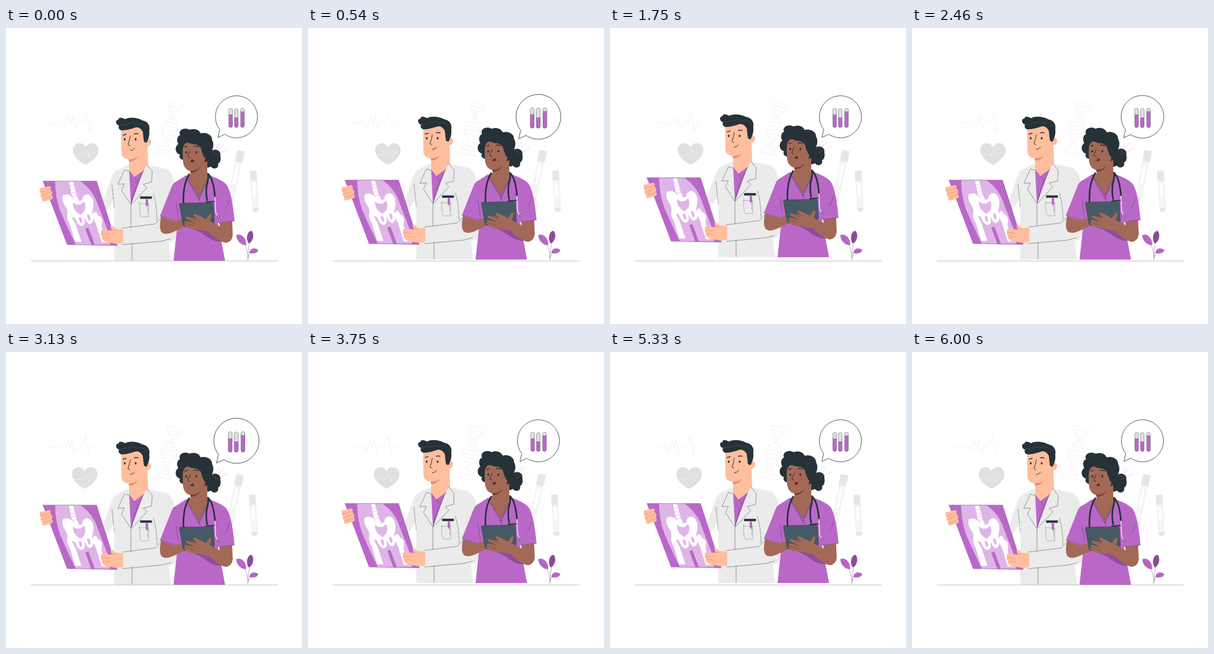
These frames come from a looping animation (500 px wide and 500 px high, 6040 ms). An HTML page:

```html
<!DOCTYPE html>
<html lang="en">
<head>
<meta charset="utf-8">
<title>Doctors reviewing an X-ray</title>
<style>
html, body { margin: 0; width: 100%; height: 100%; overflow: hidden; background: #fff; }
svg { display: block; width: 100vw; height: 100vh; }
.line { fill: none; stroke: #263238; stroke-width: .6; stroke-linecap: round; stroke-linejoin: round; }
.line.thick { stroke-width: 1; }
.line.brow { stroke-width: 1.5; }
.line.crease { stroke: #e58a70; }
.line.knuckle { stroke: #70372f; }
.line.hem { stroke: #763884; }
.dark { fill: #263238; }
.purple { fill: #ba68c8; }
.peach { fill: #ffbe9d; }
.brown { fill: #a36957; }
.coat { fill: #ebebeb; }
.pale { fill: none; stroke: #ececec; stroke-width: .7; }
.glass { fill: #f5f5f5; stroke: #ececec; stroke-width: .6; }
.cap { fill: #e6e6e6; }
.bone { fill: #fff; stroke: #fff; stroke-width: .6; stroke-linejoin: round; }
</style>
</head>
<body>
<svg viewBox="0 0 500 500">
  <g id="backdrop">
    <path class="pale" d="M73 161H84L88 158L92 161H96L100 167L106 150L110 163L113 148L117 171L121 160L126 158L130 161L136 141L141 175L145 161H152"/>
    <path fill="#e0e0e0" d="M134.500 231C126 227 113 218 113 206C113 194 128 190 134.500 201C141 190 156 194 156 206C156 218 143 227 134.500 231Z"/>
    <path fill="none" stroke="#f3f3f3" stroke-width=".7" d="M116 215H127L130 212L132 216L137 205L141 220L145 211H151"/>
    <g id="helix" class="pale"></g>
    <g transform="translate(397 207) rotate(12)">
      <path class="glass" d="M-5 19H5V84Q5 88 0 88Q-5 88-5 84Z"/>
      <path class="cap" d="M-6.500 0H6.500V19H-6.500ZM-5 80H5V84Q5 88 0 88Q-5 88-5 84Z"/>
      <path fill="#fff" d="M-2.500 25H2V58H-2.500Z"/>
    </g>
    <g transform="translate(417.500 241) rotate(-3.500)">
      <path class="glass" d="M-5 16H5V65Q5 69.500 0 69.500Q-5 69.500-5 65Z"/>
      <path class="cap" d="M-5.700 0H5.700V17H-5.700ZM-5 63H5V65Q5 69.500 0 69.500Q-5 69.500-5 65Z"/>
      <path fill="#fff" d="M-2.500 21H2V44H-2.500Z"/>
    </g>
  </g>

  <path d="M42 393.500H459" stroke="#c4c4c4"/>
  <g>
    <path class="line" stroke-opacity=".6" d="M408.500 392C409 380 406 370 401 362M409 386C409 374 411 367 412 359M409 389C410 382 413 379 418 377"/>
    <path class="purple" d="M405.500 367C396 367 389 358 389 350C397 346 407 355 405.500 367ZM411 380C412 372 420 370 426 375C425 381 417 382 411 380Z"/>
    <path fill="#8f4c9c" d="M410 364C404 355 408 343 414.500 342.500C420 347 418 361 410 364Z"/>
    <path class="line" stroke-opacity=".3" d="M391 352L404 366M415 345L410 362M412 379L425 375"/>
  </g>

  <g id="man">
    <path class="coat" d="M206 231L190 239Q181 243 178 253L160 303L170 309L183 289V393H279L275 361Q286 361 288 350L287 280Q286 246 271 238L238 231Z"/>
    <path class="purple" d="M208 239L217 252L233 238L235 260L211 299L207 270Z"/>
    <path class="peach" d="M208 218V241L217.500 251L233 240L240 231L239 198Z"/>
    <path class="peach" d="M195 170C194 184 195 199 195 211C196 222 208 224 218 220C229 218 235 208 238 200C247 200 248 186 239 187L233 165Z"/>
    <path fill="#e58a70" d="M207 222Q215 223 223 217Q218 225 208 226Z"/>
    <path class="dark" d="M195 173C191 172 189 168 191 165C185 164 184 154 190 155C190 150 196 151 201 154C208 150 222 151 230 156C239 157 244 165 242 173C243 180 241 188 237 194L233 192L231 175C228 170 224 167 219 168C212 170 204 173 195 173Z"/>
    <path fill="none" stroke="#59676d" stroke-width=".4" d="M190 163C204 167 209 157 222 162Q232 159 240 170"/>
    <path class="line thick" d="M210 182Q209 189 206 197L209.500 199M210 207Q214 207 217 203"/>
    <path class="line brow" d="M198 181L203 179.500M217 179Q220 177.500 223 179"/>
    <path class="line crease" d="M238 193Q240 190 242 192"/>
    <ellipse class="dark" cx="200.500" cy="188" rx="1.500" ry="2"/>
    <ellipse class="dark" cx="219" cy="188" rx="1.500" ry="2"/>
    <path class="coat" d="M206 232L189 264H200L195 274L211 299L208 240ZM238 231L232 241L211 299L238 271L232 264L246 261L247 243Z"/>
    <g class="line" stroke-opacity=".8">
      <path d="M208 242L200 240L189 264L200 263.500L195 274L211 298Q217 270 233 240M238 231L247 242L246 260L232 264L238 270L211 299V336M213 364V392"/>
      <path d="M217.500 251L222 259M179 265Q181 285 183 304M249 281Q255 300 255 326" stroke-dasharray="5 1.500"/>
      <path d="M226 295Q225 318 229 319H241V297M225 297H241" stroke-opacity=".5"/>
      <path d="M197 338L252 331L264 319M197 366L263 360L278 356"/>
    </g>
    <path class="dark" d="M226.500 284.500H246.500V288.500H226.500Z"/>
    <path class="purple" d="M236 289H239.500V299L238 302L236 299Z"/>
    <path class="line" d="M239.500 290V312" stroke-opacity=".5"/>

    <path class="purple" d="M62 258.500H153L188 367.500L103 366Z"/>
    <path fill="#dfb5e7" d="M83 259H126Q148 274 156 301L175 350L176 366H150L139 337L134 339L144 366H118Q105 340 92 310Q83 286 83 259Z"/>
    <path class="bone" d="M107 260H113L116 271L119 283L123 291L117 292L111 281Z"/>
    <path class="bone" fill-rule="evenodd" d="M96 283C104 279 111 283 115 290Q121 294 129 291C129 282 137 278 143 284C150 292 147 304 145 312Q150 318 146 328Q141 335 136 326L132 319L133 329Q129 339 121 330L116 320Q107 320 104 311Q104 305 99 299Q94 291 96 283ZM113 294Q112 304 119 311L126 316L133 309Q136 300 132 293L126 298L118 298ZM122 320L125 329Q129 331 129 326L127 319ZM136 315L139 325Q144 327 143 321L141 315Z"/>
    <path class="bone" d="M104 312Q109 312 111 320L117 331L127 361H117L108 331Q102 323 104 312ZM148 311Q154 310 155 317Q162 318 162 327L161 336L171 362H162L152 330Q146 322 148 311Z"/>
    <path fill="none" stroke="#dfb5e7" stroke-width=".7" d="M107 267L114 266M109 273L116 272M111 279L118 277M114 285L120 283"/>
    <path class="line" stroke-opacity=".4" d="M62 258.500H153L188 367.500L103 366"/>

    <path class="peach" d="M57 273Q56 270 60 270L73 267Q77 268 75 272L77 276Q80 278 77 282L79 285Q80 289 75 290L65 293Q60 294 61 287Q57 284 59 280Q56 277 57 273Z"/>
    <path class="line crease" d="M59 277L74 272M60 283L76 277M63 288L77 284"/>
    <path class="peach" d="M177 334Q181 334 185 339L198 340V363Q189 366 178 363Q166 363 164 358Q159 356 163 353Q158 350 161 347Q158 342 163 341L179 342Q176 337 177 334Z"/>
    <path class="line crease" d="M161 347L175 349M163 353L176 355M179 341L185 342"/>
  </g>

  <g id="woman">
    <path class="dark" d="M300 223C293 222 292 217 294 214C286 212 284 201 291 196C287 189 290 182 294 181C290 172 302 167 310 172C317 169 326 171 329 178C338 175 349 181 348 189C352 196 350 202 348 207C355 203 364 208 362 216C364 222 361 229 358 229C361 236 351 241 346 234C342 237 336 236 333 233Z"/>
    <path fill="none" stroke="#ba68c8" stroke-width=".5" stroke-opacity=".6" d="M351 213L367 197M352 216L375 205M349 211L361 195"/>
    <path class="purple" d="M304 249L290 258Q282 261 279 270L260 318L290 328L283 393H370L358 329L386 326Q382 281 374 267Q369 258 344 249Z"/>
    <path class="brown" d="M311 235L312 246L306 253L326 286L343 251L340 245V225Z"/>
    <path class="brown" d="M299 193Q298 213 299 226Q301 241 314 242Q330 240 336 224L338 212L331 196Q318 199 304 192Z"/>
    <path fill="#7d3f35" d="M311 241Q322 242 329 234Q324 244 312 245Z"/>
    <path class="dark" d="M298 209Q298 199 304 194Q317 191 329 202Q331 211 335 219L341 219L343 192L315 178L296 186Z"/>
    <path class="line thick" d="M311 207Q308 214 307 217L311 219"/>
    <path class="line brow" d="M302 201L306 200M318 200Q321 198.500 325 201"/>
    <g class="line">
      <path d="M304 252L326 289L344 250M325 287L328 293"/>
      <path d="M287 293L291 320M370 306Q375 301 377 290" stroke-opacity=".7"/>
    </g>
    <path fill="#63272b" d="M311 225L316 221.500L318 225Q314 229 311 225Z"/>
    <ellipse class="dark" cx="304.500" cy="210" rx="1.500" ry="2"/>
    <ellipse class="dark" cx="321.500" cy="210" rx="1.500" ry="2"/>
    <path fill="none" stroke="#7e3f8b" stroke-width=".7" d="M308 256L326 284L340 256"/>
    <path fill="none" stroke="#263238" stroke-width="2.700" d="M310 246Q298 265 300 298M341 245Q343 252 339 266Q337 279 340 292M342 247Q351 257 353 286"/>
    <path fill="none" stroke="#263238" stroke-width="2" d="M337 294L354 293"/>
    <path fill="none" stroke="#dfe3e5" stroke-width="1.600" d="M353 285L354 311L357 317"/>
    <circle cx="359" cy="319" r="2" class="dark"/><circle cx="359" cy="319" r="1.200" fill="#dfe3e5"/>
    <path fill="#8f4c9c" d="M304 336Q325 341 340 353Q353 362 364 361L358 335L330 334Z"/>
    <path class="brown" d="M262 319L290 328L288 325L302 321L310 332Q299 337 286 343Q268 352 262 344Q258 336 262 319Z"/>
    <path fill="#455a64" stroke="#263238" stroke-width=".5" d="M295 296L348 295Q350 295 350.500 298L352 327Q352 330 349 331L304 335Q300 336 299 332L293 299Q292 296 295 296Z"/>
    <path class="brown" d="M360 329L382 326L383 350Q382 361 372 363Q361 362 342 344L321 340Q310 341 304 335Q299 332 303 330Q300 326 305 326L317 328L304 322Q302 318 308 319L323 322L317 317Q316 312 322 315L338 323Q342 316 346 313Q348 317 344 326L361 335Z"/>
    <path class="line knuckle" d="M304 325L319 330M303 330L317 335M308 319L321 325"/>
    <path class="line hem" d="M260 318L290 327M358 329L386 326"/>
  </g>

  <g id="bubble">
    <path fill="#fff" stroke="#263238" stroke-width=".8" d="M361 171.500L358 185L369.500 179.500A35.500 35.500 0 1 0 361 171.500Z"/>
    <g id="vials"></g>
  </g>
</svg>
<script>
const LOOP = 6040;
const byId = id => document.getElementById(id);

function add(parent, tag, attrs) {
  const node = document.createElementNS('http://www.w3.org/2000/svg', tag);
  for (const name in attrs) node.setAttribute(name, attrs[name]);
  parent.append(node);
}

// Two crossing strands along a leaning axis, joined by rungs.
function drawHelix() {
  const strands = ['', ''];
  let rungs = '';
  for (let i = 0; i <= 40; i++) {
    const p = i / 40;
    const spread = 13 * Math.cos(2 * Math.PI * p);
    const x = 287 - 21 * p, y = 127 + 88 * p;
    const ends = [1, -1].map(side => `${x + side * spread} ${y + side * spread * .24}`);
    ends.forEach((end, k) => strands[k] += (i ? 'L' : 'M') + end);
    if (i % 3 === 0) rungs += `M${ends[0]}L${ends[1]}`;
  }
  add(byId('helix'), 'path', { d: strands.join('') + rungs });
}

function drawVials() {
  const vials = [[379.5, 135.5, 146], [389, 136, 151], [399.5, 135.5, 141]];
  for (const [x, top, level] of vials) {
    const bottom = `V165Q${x + 3} 168 ${x} 168Q${x - 3} 168 ${x - 3} 165Z`;
    const glass = `M${x - 3} ${top + 2}Q${x} ${top - 2} ${x + 3} ${top + 2}${bottom}`;
    add(byId('vials'), 'path', { fill: '#e0e0e0', d: glass });
    add(byId('vials'), 'path', { class: 'purple', d: `M${x - 3} ${level}H${x + 3}${bottom}` });
    add(byId('vials'), 'path', { class: 'line', 'stroke-opacity': .7, d: glass });
  }
}

const hump = (t, start, length) =>
  t < start || t > start + length ? 0 : Math.sin(Math.PI * (t - start) / length) ** 2;

function drift(t) {
  const keys = [[0, 0], [1080, 1], [2500, 2.2], [3080, -1.6], [4420, -1.4], [5330, -.8], [LOOP, 0]];
  const next = keys.findIndex(key => key[0] > t);
  const [t0, x0] = keys[next - 1], [t1, x1] = keys[next];
  return x0 + (x1 - x0) * (t - t0) / (t1 - t0);
}

function render(t) {
  const lift = -6 * Math.sin(2 * Math.PI * t / LOOP) ** 2;
  const scale = 1 + .08 * (hump(t, 0, 1500) + hump(t, 2250, 1500));
  for (const id of ['man', 'woman']) byId(id).setAttribute('transform', `translate(0 ${lift})`);
  byId('backdrop').setAttribute('transform', `translate(${drift(t)} 0)`);
  byId('bubble').setAttribute('transform', `translate(389.5 150) scale(${scale}) translate(-389.5 -150)`);
}

drawHelix();
drawVials();
const start = performance.now();
function tick() {
  render((performance.now() - start) % LOOP);
  requestAnimationFrame(tick);
}
tick();
</script>
</body>
</html>
```
